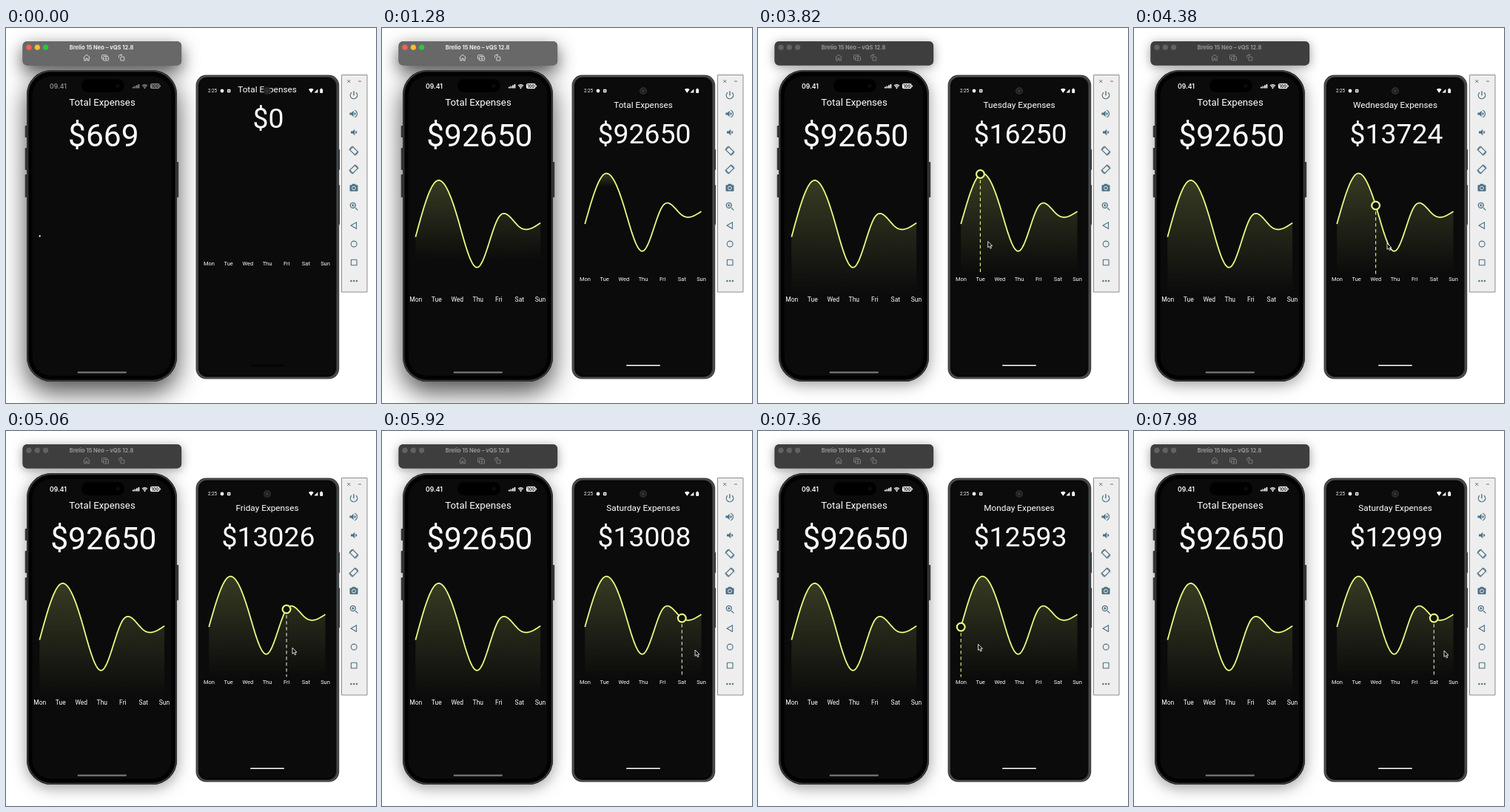
Write an HTML page with a canvas that moves like this. It is 500x507 px and loops after 8000 ms.

```html
<!DOCTYPE html>
<html lang="en">
<head>
<meta charset="utf-8">
<title>Expenses chart</title>
<style>
html, body { margin: 0; width: 100%; height: 100%; overflow: hidden; background: #fff; }
canvas { display: block; width: 500px; height: 507px; }
</style>
</head>
<body>
<canvas id="stage"></canvas>
<script>
const W = 500, H = 507, LOOP = 8000, TICK = 20, TAU = Math.PI * 2;
const canvas = document.getElementById('stage');
const ctx = canvas.getContext('2d');
const dpr = window.devicePixelRatio || 1;
canvas.width = W * dpr;
canvas.height = H * dpr;

const LIME = '#eaf984', SCREEN = '#0b0b0b', TOOL = '#4c7187';
const ROBOTO = 'Roboto, sans-serif', INTER = 'Inter, sans-serif';
const DAYS = ['Monday', 'Tuesday', 'Wednesday', 'Thursday', 'Friday', 'Saturday', 'Sunday'];
const SPEND = [12400, 16250, 13724, 10300, 13700, 12999, 13277];
const TOTAL = SPEND.reduce((a, b) => a + b);
const LEVEL = [265, 197.5, 240, 301.5, 241, 253, 248];
const SETTLED = 60; // first layout pass is over

// [start time, day index]
const PICKS = [
  [3241.645, 0], [3440, 1], [3920, 2], [4425, 3], [4854.4, 4], [5260, 5], [5880, 6],
  [6170, 5], [6320, 4], [6625.3, 3], [6790, 2], [6960, 1], [7120, 0],
  [7390, 1], [7462, 2], [7534, 3], [7606, 4], [7678, 5]
];
// [time, x, y] of the pointer tip
const PATH = [
  [1400, 500, 262], [1580, 455, 215], [1840, 455, 215], [2180, 419, 190], [2440, 419, 190],
  [2840, 280.5, 286], [3280, 280.5, 286], [4380, 342, 291], [5060, 387, 293], [5720, 414, 296],
  [6050, 429, 296], [6720, 330, 287], [7160, 277, 286], [7300, 278, 287], [7700, 408, 295], [7980, 419, 297]
];

const clamp = v => Math.max(0, Math.min(1, v));
const lerp = (a, b, k) => a + (b - a) * k;
const ease = p => { p = clamp(p); return p < .5 ? 2 * p * p : 1 - 2 * (1 - p) * (1 - p); };
const mix = (a, b, k) => `rgb(${a.map((v, i) => Math.round(lerp(v, b[i], k)))})`;
const gray = (a, b, k) => mix([a, a, a], [b, b, b], k);

// Second derivatives of a natural cubic spline with unit spacing
function bends(y) {
  const n = y.length - 1, c = [0], d = [0], m = Array(n + 1).fill(0);
  for (let i = 1; i < n; i++) {
    const den = 4 - c[i - 1];
    c[i] = 1 / den;
    d[i] = (6 * (y[i - 1] - 2 * y[i] + y[i + 1]) - d[i - 1]) / den;
  }
  for (let i = n - 1; i > 0; i--) m[i] = d[i] - c[i] * m[i + 1];
  return m;
}
const BEND = bends(LEVEL);
function level(u) {
  const i = Math.min(5, Math.floor(u)), b = u - i, a = 1 - b;
  return a * LEVEL[i] + b * LEVEL[i + 1] + ((a ** 3 - a) * BEND[i] + (b ** 3 - b) * BEND[i + 1]) / 6;
}

function makeChart(x0, step, mapY, top, bottom) {
  const line = new Path2D(), area = new Path2D();
  let len = 0, px, py;
  for (let k = 0; k <= 180; k++) {
    const x = x0 + k / 30 * step, y = mapY(level(k / 30));
    if (k) { line.lineTo(x, y); area.lineTo(x, y); len += Math.hypot(x - px, y - py); }
    else { line.moveTo(x, y); area.moveTo(x, y); }
    px = x; py = y;
  }
  area.lineTo(px, bottom);
  area.lineTo(x0, bottom);
  area.closePath();
  return { x0, step, line, area, len, top, bottom };
}
const leftChart = makeChart(45.3, 28.13, y => 206 + (y - 196.6) * 1.12, 206, 360);
const rightChart = makeChart(274.2, 26.22, y => y, 196.6, 333);

function box(x, y, w, h, r, fill, stroke, lw = 1) {
  ctx.beginPath();
  ctx.roundRect(x, y, w, h, r);
  if (fill) { ctx.fillStyle = fill; ctx.fill(); }
  if (stroke) { ctx.strokeStyle = stroke; ctx.lineWidth = lw; ctx.stroke(); }
}
function disc(x, y, r, fill, stroke, lw = 1) {
  ctx.beginPath();
  ctx.arc(x, y, r, 0, TAU);
  if (fill) { ctx.fillStyle = fill; ctx.fill(); }
  if (stroke) { ctx.strokeStyle = stroke; ctx.lineWidth = lw; ctx.stroke(); }
}
function arc(x, y, r, from, to, color, lw) {
  ctx.beginPath();
  ctx.arc(x, y, r, from, to);
  ctx.strokeStyle = color;
  ctx.lineWidth = lw;
  ctx.stroke();
}
function text(s, x, y, size, color = '#fff', family = ROBOTO, weight = 400, align = 'center') {
  ctx.font = `${weight} ${size}px ${family}`;
  ctx.textAlign = align;
  ctx.fillStyle = color;
  ctx.fillText(s, x, y);
}
function shape(d, x, y, fill, stroke, lw = 1) {
  const p = new Path2D(d);
  ctx.save();
  ctx.translate(x, y);
  if (fill) { ctx.fillStyle = fill; ctx.fill(p); }
  if (stroke) { ctx.strokeStyle = stroke; ctx.lineWidth = lw; ctx.stroke(p); }
  ctx.restore();
}

function drawChart(c, drawn, shade) {
  if (shade > 0) {
    const g = ctx.createLinearGradient(0, c.top, 0, lerp(c.top + 1, c.bottom, shade));
    g.addColorStop(0, 'rgba(234,249,132,.2)');
    g.addColorStop(1, 'rgba(234,249,132,0)');
    ctx.fillStyle = g;
    ctx.fill(c.area);
  }
  if (drawn <= 0) return;
  ctx.save();
  ctx.strokeStyle = LIME;
  ctx.lineWidth = 1.8;
  ctx.lineJoin = 'round';
  if (drawn < 1) ctx.setLineDash([drawn * c.len, c.len + 10]);
  ctx.stroke(c.line);
  ctx.restore();
}
function drawLabels(x0, step, y, size) {
  DAYS.forEach((d, i) => text(d.slice(0, 3), x0 + i * step, y, size));
}

function titleBar(k) {
  box(22.5, 18, 214.6, 32.5, 6, gray(104, 62, k));
  [[254, 95, 87], [254, 188, 46], [40, 200, 64]].forEach((c, i) =>
    disc(31 + i * 11.3, 26.2, 3.6, mix(c, [98, 98, 98], k)));
  text('Brelio 15 Neo – vQS 12.8', 129, 28.8, 7.5, gray(238, 150, k), INTER, 700);
  const ink = gray(225, 132, k);
  shape('M-4.5 0L0-4L4.5 0M-3.2-.5V4H-1V1H1V4H3.2V-.5', 109, 40, null, ink, .9);
  box(129.5, 36.5, 7, 5.5, 1, null, ink, .9);
  box(131.5, 38.5, 7, 5.5, 1, gray(104, 62, k), ink, .9);
  disc(135, 41.2, 1.2, null, ink, .8);
  box(154.8, 39, 5, 5, .8, null, ink, .9);
  shape('M-3 1V-1.5Q-3-3-1.5-3H1M-.3-4.5L1.2-3L-.3-1.5', 155.5, 39.5, null, ink, .8);
}

function wifi(x, y, r, color) {
  for (const q of [1, .62]) arc(x, y, r * q, -Math.PI * .75, -Math.PI * .25, color, 1.3);
  disc(x, y - .8, 1.1, color);
}

function leftPhone(t) {
  const k = clamp((t - 1840) / 300);
  ctx.save();
  ctx.shadowColor = `rgba(0,0,0,${lerp(.7, .4, k)})`;
  ctx.shadowBlur = lerp(34, 20, k) * dpr;
  ctx.shadowOffsetY = lerp(14, 4, k) * dpr;
  box(28, 57, 203, 421, 33, '#151515');
  ctx.shadowBlur *= .7;
  ctx.shadowOffsetY *= .6;
  box(22.5, 18, 214.6, 32.5, 6, '#555');
  ctx.restore();
  titleBar(k);

  for (const [x, y, h] of [[25.7, 132, 16], [25.7, 162, 30], [25.7, 198, 31], [229.6, 181, 48]])
    box(x, y, 3.6, h, 1, '#353535');
  box(28, 57, 203, 421, 33, '#1c1c1c');
  box(29.2, 58.2, 200.6, 418.6, 32, null, '#424242', 1.2);
  box(30.5, 59.5, 198, 416, 31, '#020202');
  box(35.5, 65, 188, 405, 26, SCREEN);
  box(102, 69, 58, 18, 9, '#000');
  disc(151, 78, 2.6, '#0b0c14');

  const lit = gray(140, 255, clamp((t - 20) / 220));
  text('09.41', 70.5, 82, 8.6, lit, INTER, 600);
  for (let i = 0; i < 4; i++) box(171 + i * 2.5, 79.6 - i * 1.2, 1.8, 2 + i * 1.2, .5, lit);
  wifi(187.5, 81.7, 5, lit);
  box(195, 75, 12.5, 7, 2, lit);
  box(208.1, 77.2, .9, 2.6, .4, lit);
  text('100', 201.2, 80.6, 5.6, '#111', INTER, 700);

  const p = ease((t + 60.1) / 1000);
  text('Total Expenses', 130, 105, 13.25);
  text('$' + Math.floor(TOTAL * p), 131.8, 160, 42.5);
  drawChart(leftChart, p, ease((t - 1096) / 300));
  if (t >= SETTLED) drawLabels(45.7, 28.03, 369.7, 8.5);
  box(96.5, 464.4, 66.5, 2.3, 1.1, '#777');
}

function spent(t) {
  let from = TOTAL * ease((t - 45) / 1000);
  PICKS.forEach(([at, day], i) => {
    if (at > t) return;
    const end = i + 1 < PICKS.length ? Math.min(t, PICKS[i + 1][0]) : t;
    from = lerp(from, SPEND[day], ease((end - at) / 300));
  });
  return Math.floor(from);
}

function marker(day) {
  const x = rightChart.x0 + day * rightChart.step, y = LEVEL[day];
  ctx.save();
  ctx.beginPath();
  ctx.moveTo(x, y);
  ctx.lineTo(x, 332.5);
  ctx.setLineDash([4.4, 3.6]);
  ctx.strokeStyle = day > 3 ? '#e4e5d8' : LIME;
  ctx.lineWidth = 1.1;
  ctx.stroke();
  ctx.restore();
  disc(x, y, 5.4, '#10110c', LIME, 2.2);
}

function rightPhone(t) {
  const ready = t >= SETTLED, inset = ready ? 0 : -21;
  box(448, 164, 3, 28, 1, '#2a2a2a');
  box(448, 212, 3, 54, 1, '#2a2a2a');
  box(256.6, 63.6, 193.6, 410.9, 14, '#2e2f31');
  box(258.4, 65.3, 190, 407.5, 12.5, null, '#505153', 1.8);
  box(260.3, 66.8, 185.6, 404.6, 11.5, '#050505');
  box(261.5, 68.5, 183.5, 400.5, 10, SCREEN);

  const pick = PICKS.filter(p => p[0] + 45 <= t).pop();
  text((pick ? DAYS[pick[1]] : 'Total') + ' Expenses', 353, 108 + inset, 11.8);
  text('$' + spent(t), 354.5, 156.2 + inset, 37.4);

  text('2:25', 273, 87.4, 6.3, '#eee', ROBOTO, 400, 'left');
  disc(292, 85, 2.4, '#eee');
  box(299, 82.8, 4.4, 4.4, .8, '#eee');
  disc(301.2, 85, .9, '#333');
  shape('M-3.4-2.3Q0-4.6 3.4-2.3L0 2.4Z', 412.3, 85.3, '#fff');
  shape('M-2.6 2.5L2.4-2.6V2.5Z', 419, 85, '#fff');
  box(424.3, 82.5, 3.8, 5.4, .7, '#fff');
  box(425.3, 81.7, 1.8, 1.2, 0, '#fff');
  disc(353, 85, 5, '#2b2c2d');
  disc(353, 85, 3.4, '#222325');
  disc(353, 85, 1.2, '#3b4046');

  ctx.save();
  ctx.translate(0, inset);
  drawChart(rightChart, ease((t - 45) / 1000), ease((t - 1204) / 300));
  drawLabels(274.5, 26.17, 341.8, 7.5);
  if (pick) marker(pick[1]);
  ctx.restore();
  box(330, 455.4, 46, 1.7, .8, ready ? '#fff' : '#000');
}

function speaker(y, loud) {
  const x = loud ? 469.4 : 471;
  shape('M-5-1.6H-2.5L.2-4.2V4.2L-2.5 1.6H-5Z', x, y, TOOL);
  shape('M1.3-2.3Q3.4-1.2 3.4 0Q3.4 1.2 1.3 2.3Z', x, y, TOOL);
  if (loud) arc(x + .3, y, 4.9, -1.3, 1.3, TOOL, 1.2);
}
function turnIcon(y, dir) {
  ctx.save();
  ctx.translate(470, y);
  ctx.scale(dir, 1);
  ctx.save();
  ctx.rotate(Math.PI / 4);
  box(-4.8, -2.9, 9.6, 5.8, .6, null, TOOL, 1.2);
  ctx.restore();
  shape('M-6-.6Q-5.4-5.4-.8-6M6 .6Q5.4 5.4.8 6', 0, 0, null, TOOL, 1);
  ctx.restore();
}

function toolbar() {
  box(453.5, 63.5, 34.5, 293.5, 0, '#eeeeee', '#8c8c8c');
  shape('M-2-2L2 2M2-2L-2 2', 463.3, 72, null, '#666', .9);
  shape('M-2 0H2', 478, 72, null, '#666', .9);

  arc(470, 91, 4.7, -.9, Math.PI + .9, TOOL, 1.3);
  shape('M0-5.7V.2', 470, 91, null, TOOL, 1.4);
  speaker(116, true);
  speaker(141, false);
  turnIcon(166, 1);
  turnIcon(191, -1);
  box(464.5, 212.2, 11, 8.6, 1, TOOL);
  box(467.5, 210.8, 5, 3, .8, TOOL);
  disc(470, 216.4, 2.4, TOOL, '#eee', 1);
  disc(468.8, 239.8, 3.5, null, TOOL, 1.3);
  shape('M2 2L5.4 5.4M-1.2-3V.6M-3-1.2H.6', 470, 241, null, TOOL, 1.2);
  shape('M3.2-4.2V4.2L-4.2 0Z', 470.3, 267, null, TOOL, 1.1);
  disc(470.2, 292, 3.9, null, TOOL, 1.1);
  box(466.4, 313.2, 7.6, 7.6, .3, null, TOOL, 1.1);
  for (const x of [466.4, 470.2, 474]) disc(x, 342, 1.2, TOOL);
}

function pointer(t) {
  if (t < PATH[0][0]) return;
  let i = PATH.findIndex(p => p[0] > t);
  if (i < 0) i = PATH.length - 1;
  const a = PATH[i - 1], b = PATH[i], k = clamp((t - a[0]) / (b[0] - a[0]));
  shape('M0 0V8.3L1.9 6.6L3.3 9.7L4.8 9L3.4 6H6Z', lerp(a[1], b[1], k), lerp(a[2], b[2], k), '#0c0c0c', '#eee', .9);
}

const start = performance.now();
function frame() {
  const now = (performance.now() - start) % LOOP;
  const t = Math.floor(now / TICK) * TICK;
  ctx.setTransform(dpr, 0, 0, dpr, 0, 0);
  ctx.fillStyle = '#fff';
  ctx.fillRect(0, 0, W, H);
  leftPhone(t);
  rightPhone(t);
  toolbar();
  pointer(t);
  requestAnimationFrame(frame);
}
frame();
</script>
</body>
</html>
```
